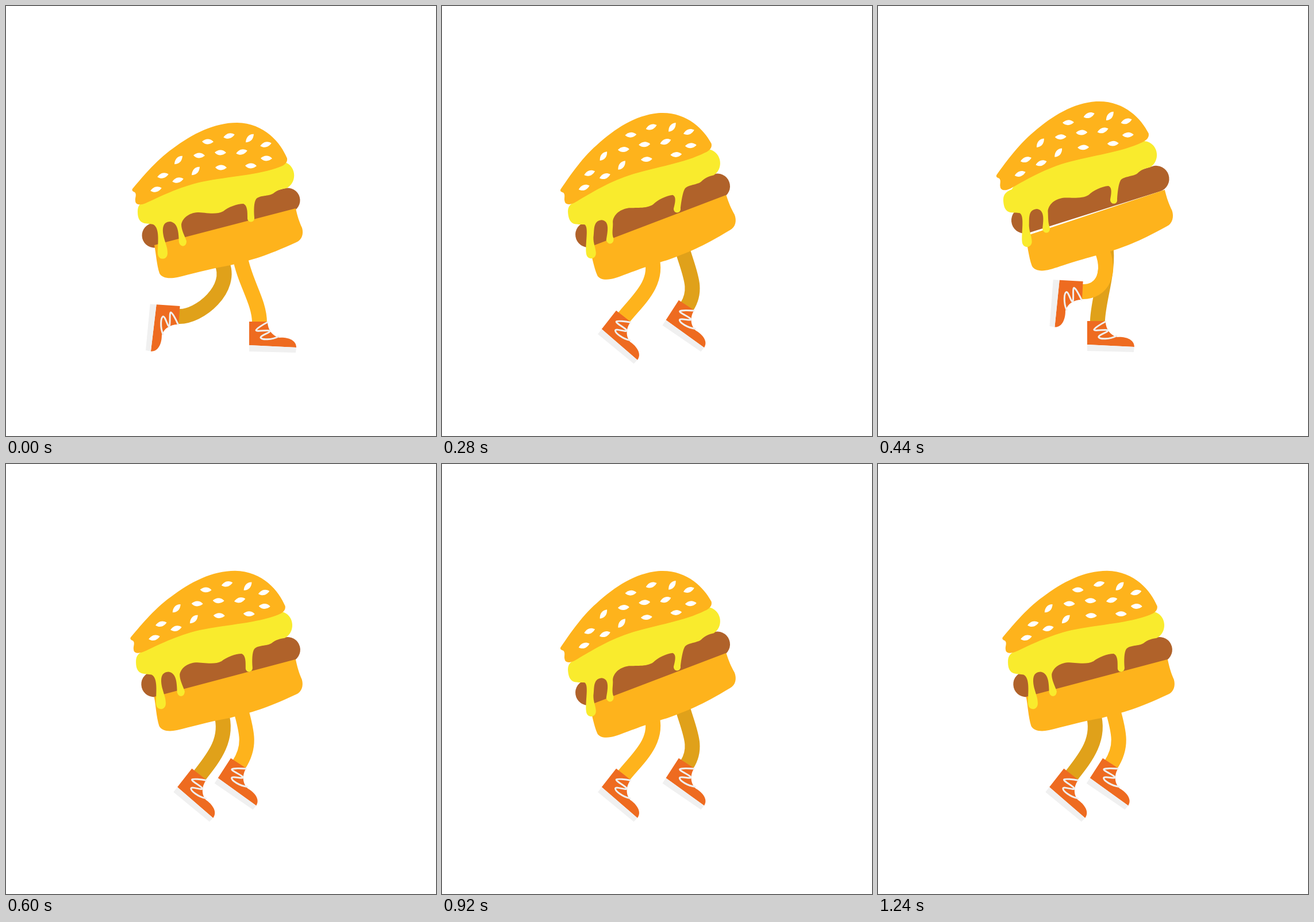
Write an HTML page with a canvas that moves like this. It is 748x748 px and loops after 1.28 s.

```html
<!DOCTYPE html>
<html lang="en">
<head>
<meta charset="utf-8">
<title>Running burger</title>
<style>
  html, body { margin: 0; height: 100%; overflow: hidden; background: #fff; }
  canvas { display: block; }
</style>
</head>
<body>
<canvas id="stage" width="748" height="748"></canvas>
<script>
const ctx = document.getElementById('stage').getContext('2d');
const CYCLE = 640, STEP = 40;
const BUN = '#feb31c', SHADE = '#e0a11a', CHEESE = '#f9eb2d', PATTY = '#b0622a';
const SHOE = '#ee6b20', SOLE = '#f0f0f0';

// One stride shared by both legs: phase in ms, reach, ankle height, shoe angle
const stride = [
  [0, 92, 549, 0], [40, 89, 549, 0], [120, 9, 548, 0], [280, -44, 539, 38],
  [320, -90, 537, 94], [440, -12, 494, 93], [600, 45, 520, 33]
];

const seedSpots = [
  [300, 268], [273, 295], [351, 236], [299, 303], [336, 260],
  [330, 287], [261, 319], [373, 255], [410, 254], [374, 281],
  [424, 230], [388, 226], [426, 278], [452, 241], [453, 265]
];
const seedTurns = [-46, -14, 2, -14, 2];

const topBun = new Path2D(`M220 318C233 303 260 269 290 248C325 222 362 203 402 203
  C450 204 478 238 489 265C490 272 485 277 476 280C440 294 390 296 340 306
  C300 315 265 333 243 343C234 347 225 346 225 339C224 334 228 328 224 324C219 322 219 320 220 318Z`);
const bottomBun = new Path2D(`M258 416L504 352C507 366 510 375 515 386C518 396 515 407 505 411
  C450 436 430 441 390 451C350 458 320 467 298 472C283 475 271 473 267 465C262 450 261 430 258 416Z`);
const patty = new Path2D('M258 399L490 338');
const seed = new Path2D('M-.5 0C-.25 -.5 .15 -.8 .5 0C.25 .5 -.15 .8 -.5 0Z');
const shoe = new Path2D('M-15 0H17C17 12 24 25 38 28C50 27 67 31 67 45L-15 41Z');
const sole = new Path2D('M-15 41L67 45L66 54L-15 52Z');
const laces = new Path2D('M17 1C9 5-2 12-3 15C-3 18 18 14 21 16C23 19 4 24 5 28C7 32 24 32 36 26');

// w moves the tips of the three drips sideways
const cheesePath = (w, r = w * .7) => new Path2D(`M229 358C229 347 233 342 245 338
  C290 280 400 250 486 272C506 280 506 308 488 317
  C480 318 472 320 465 326C458 331 440 329 435 336C431 342 ${431 + r * .5} 356 ${432 + r} 368
  C${433 + r} 378 ${419 + r} 378 ${420 + r} 368C${420 + r * .5} 358 420 347 413 344
  C402 344 386 350 378 357C366 364 345 359 333 359C318 360 307 369 305 380
  C305 390 ${311 + w} 400 ${314 + w} 409C${314 + w} 420 ${303 + w} 420 ${301 + w} 411
  C${300 + w * .6} 398 301 378 286 375C270 375 272 392 ${275 + w * .6} 404
  C${278 + w} 415 ${281 + w} 420 ${281 + w} 430C${281 + w} 443 ${264 + w} 443 ${264 + w} 430
  C${264 + w} 412 ${268 + w * .5} 386 256 380C246 377 229 383 229 358Z`);

// Periodic cubic Hermite through the keys
function sample(keys, t) {
  const n = keys.length;
  const key = j => keys[(j + n) % n];
  const time = j => key(j)[0] + CYCLE * Math.floor(j / n);
  const i = keys.findLastIndex(k => k[0] <= t);
  const span = time(i + 1) - time(i), u = (t - time(i)) / span;
  const slope = (j, c) => (key(j + 1)[c] - key(j - 1)[c]) / (time(j + 1) - time(j - 1)) * span;
  return [1, 2, 3].map(c => {
    const a = key(i)[c], b = key(i + 1)[c], p = slope(i, c), q = slope(i + 1, c);
    return a + u * (p + u * (3 * (b - a) - 2 * p - q + u * (2 * (a - b) + p + q)));
  });
}

function local(x, y, degrees, draw) {
  ctx.save();
  ctx.translate(x, y);
  ctx.rotate(degrees * Math.PI / 180);
  draw();
  ctx.restore();
}

function fill(path, color) {
  ctx.fillStyle = color;
  ctx.fill(path);
}

function stroke(path, color, width, cap) {
  ctx.strokeStyle = color;
  ctx.lineWidth = width;
  ctx.lineCap = cap;
  ctx.stroke(path);
}

function drawLeg(t, delay, hop, color) {
  const phase = (t + delay) % CYCLE, turnOf = ms => ms / CYCLE * 2 * Math.PI;
  const wide = 1 - .25 * Math.cos(turnOf(t));
  const [reach, y, turn] = sample(stride, phase);
  const x = 369 + wide * reach;
  const hx = 391 + 22 * wide * Math.cos(turnOf(phase) + .2);
  const hy = 444 - 26.5 * hop - (hx - 381) * .3;
  const a = turn * Math.PI / 180, sin = Math.sin(a), cos = Math.cos(a);
  const ax = x + 3 * cos, ay = y + 3 * sin;
  const leg = new Path2D();
  leg.moveTo(hx, hy);
  leg.bezierCurveTo(hx + 8 + turn * .15, hy + 45,
    ax + 35 * sin, ay - 35 * cos, ax - 2 * sin, ay + 2 * cos);
  stroke(leg, color, 26, 'butt');
  local(x, y, turn, () => {
    fill(shoe, SHOE);
    fill(sole, SOLE);
    stroke(laces, SOLE, 3, 'round');
  });
}

function draw(t) {
  const angle = t / CYCLE * 2 * Math.PI;
  const hop = 1 - (t % 320 / 160 - 1) ** 2;
  const pivot = { x: 395, y: 437 };

  // Layers rock about one pivot; each rises and leans by its own share of the hop
  function layer(rise, lean, lead, paint) {
    const rock = 3 * (Math.cos(angle + lead) - Math.cos(lead));
    local(pivot.x - lean * hop, pivot.y - rise * hop, rock, () => {
      ctx.translate(-pivot.x, -pivot.y);
      paint();
    });
  }

  ctx.clearRect(0, 0, 748, 748);
  drawLeg(t, CYCLE / 2, hop, SHADE);
  drawLeg(t, 0, hop, BUN);
  layer(35, 1.6, .4, () => stroke(patty, PATTY, 43 + 3 * hop, 'round'));
  layer(26.5, 1, .4, () => {
    const stretch = 1 + .08 * hop;
    ctx.translate(0, 384 * (1 - stretch));
    ctx.scale(1, stretch);
    fill(bottomBun, BUN);
  });
  layer(32, 6, 0, () => fill(cheesePath(5.5 * (Math.cos(angle) - 1)), CHEESE));
  layer(39.5, 6, 0, () => {
    fill(topBun, BUN);
    seedSpots.forEach(([x, y], i) => local(x, y, seedTurns[i % 5], () => {
      ctx.scale(20, 9);
      fill(seed, '#fff');
    }));
  });
}

const start = performance.now();
function frame() {
  draw(Math.floor((performance.now() - start) / STEP) * STEP % CYCLE);
  requestAnimationFrame(frame);
}
frame();
</script>
</body>
</html>
```
